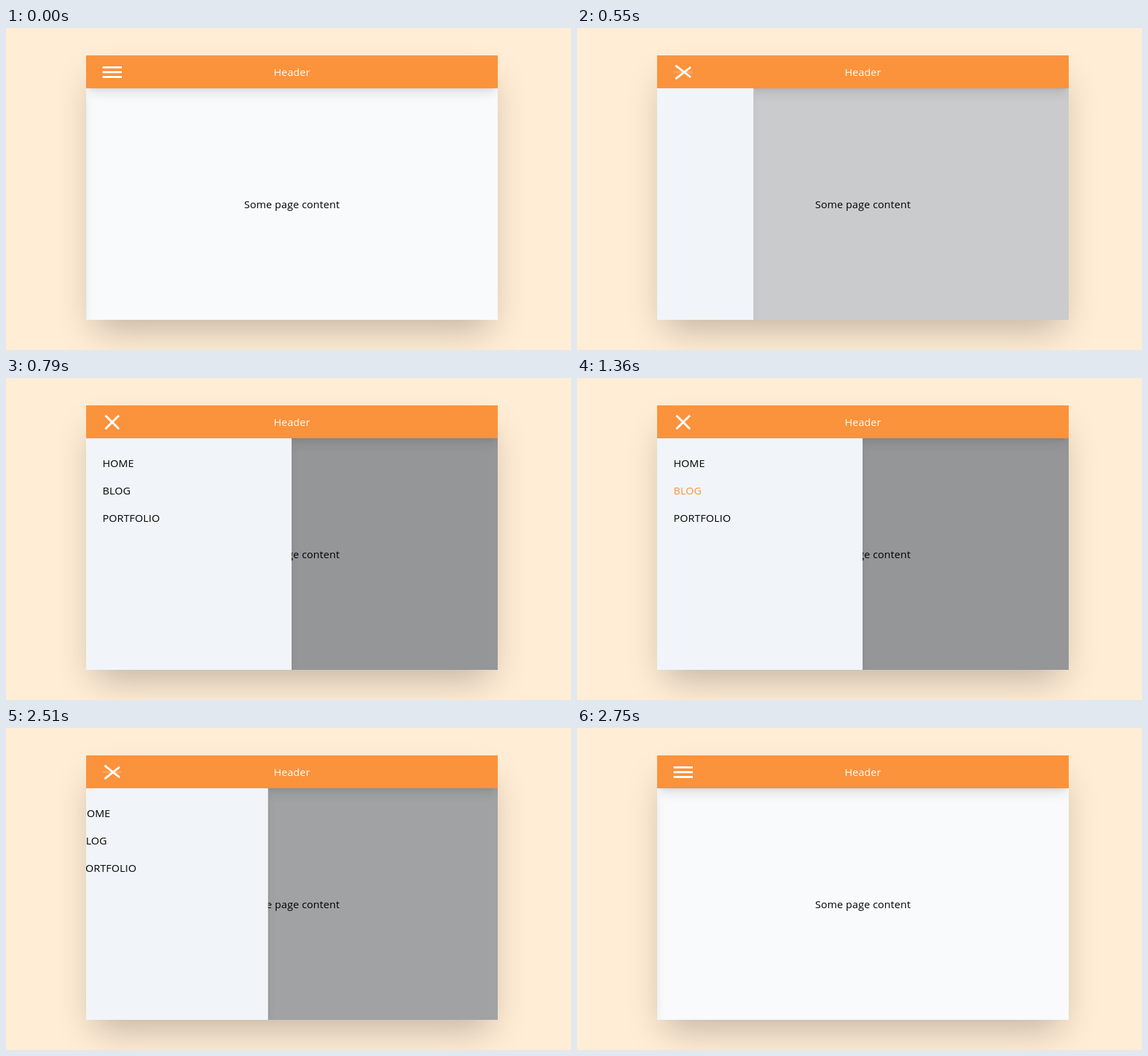
Write an HTML page that moves like this. It is 825x470 px and loops after 3110 ms.

```html
<!DOCTYPE html>
<html lang="en">
<head>
<meta charset="utf-8">
<title>Slide-in menu</title>
<style>
  html, body { margin: 0; width: 100%; height: 100%; overflow: hidden; }
  body {
    position: relative; background: #ffedd5; color: #000;
    font: 15.2px/24px "Open Sans", "Noto Sans", sans-serif;
    letter-spacing: .15px; white-space: nowrap;
  }
  .card, .header, .page, .bar, .overlay, .menu, .link, .content, .page::before { position: absolute; }
  .card {
    left: 117px; top: 40px; width: 601px; height: 386px; overflow: hidden;
    background: #f8fafc; box-shadow: 0 25px 50px -12px rgba(0, 0, 0, .25);
  }
  .header {
    left: 0; top: 0; width: 100%; height: 48px; line-height: 48px;
    background: #fb923c; color: #fff; text-align: center; font-weight: 500;
  }
  .bar { left: 24px; width: 28px; height: 3px; background: #fff; }
  .page { left: 0; top: 48px; width: 100%; height: 338px; overflow: hidden; }
  .page::before { content: ""; left: 0; top: -48px; width: 100%; height: 48px; }
  .page::before, .menu {
    box-shadow: 0 10px 15px -3px rgba(0, 0, 0, .1), 0 4px 6px -4px rgba(0, 0, 0, .1);
  }
  .content { left: 0; top: 157px; width: 100%; text-align: center; }
  .overlay { inset: 0; background: #000; }
  .page::before { z-index: 1; }
  .menu { z-index: 2; left: 0; top: 0; width: 300px; height: 100%; background: #f1f5f9; }
  .link { left: 24px; }
</style>
</head>
<body>
<div class="card">
  <div class="page">
    <div class="content">Some page content</div>
    <div class="overlay"></div>
    <div class="menu">
      <div class="link" style="top:24px">HOME</div>
      <div class="link" style="top:64px">BLOG</div>
      <div class="link" style="top:104px">PORTFOLIO</div>
    </div>
  </div>
  <div class="header">Header
    <div class="bar" style="top:16px"></div>
    <div class="bar" style="top:23px"></div>
    <div class="bar" style="top:30px"></div>
  </div>
</div>
<script>
const LOOP = 3110;
// Active spans: start, end, number of steps
const SPANS = [[500, 790, 8], [1090, 1570, 12], [1810, 2130, 8], [2460, 2750, 8]];
const OPEN = 458, CLOSE = 2470;
// Per link: pairs of hover start and end
const HOVERS = [[[1055, 1200], [1880, 1980]], [[1200, 1420], [1775, 1880]], [[1420, 1775]]];
const ORANGE = [251, 146, 60];

const overlay = document.querySelector('.overlay');
const menu = document.querySelector('.menu');
const bars = document.querySelectorAll('.bar');
const links = document.querySelectorAll('.link');

const clamp = v => Math.min(1, Math.max(0, v));

function bezier(x1, y1, x2, y2) {
  const at = (a, b, s) => 3 * s * (1 - s) ** 2 * a + 3 * s * s * (1 - s) * b + s ** 3;
  return x => {
    if (x <= 0 || x >= 1) return clamp(x);
    let lo = 0, hi = 1;
    for (let i = 0; i < 24; i++) {
      const mid = (lo + hi) / 2;
      if (at(x1, x2, mid) < x) lo = mid; else hi = mid;
    }
    return at(y1, y2, lo);
  };
}
const ease = bezier(.25, .1, .25, 1);
const quick = bezier(.4, 0, .2, 1);

// Hold the picture between the steps of each span
function snap(t) {
  let held = 0;
  for (const [from, to, n] of SPANS) {
    if (t < from) break;
    const gap = (to - from) / (n - 1);
    held = from + Math.min(n - 1, Math.floor((t - from) / gap + 1e-6)) * gap;
  }
  return held;
}

function hoverAmount(spans, t) {
  let amount = 0;
  for (const [from, to] of spans) {
    const peak = quick(clamp((to - from) / 150));
    amount += t < to ? quick((t - from) / 150) : peak * (1 - quick((t - to) / 150));
  }
  return clamp(amount);
}

function draw(time) {
  const t = snap(time);
  const slide = ease((t - OPEN) / 300) - ease((t - CLOSE) / 280);
  const cross = quick((t - OPEN) / 150) - quick((t - CLOSE) / 150);

  menu.style.transform = `translateX(${300 * (slide - 1)}px)`;
  overlay.style.opacity = .4 * slide;
  bars[0].style.transform = `translateY(${7 * cross}px) rotate(${45 * cross}deg)`;
  bars[1].style.opacity = 1 - cross;
  bars[2].style.transform = `translateY(${-7 * cross}px) rotate(${-45 * cross}deg)`;
  links.forEach((link, i) => {
    const k = hoverAmount(HOVERS[i], t);
    link.style.color = `rgb(${ORANGE.map(c => Math.round(c * k)).join(',')})`;
  });
}

const start = performance.now();
function tick() {
  draw((performance.now() - start) % LOOP);
  requestAnimationFrame(tick);
}
tick();
</script>
</body>
</html>
```
